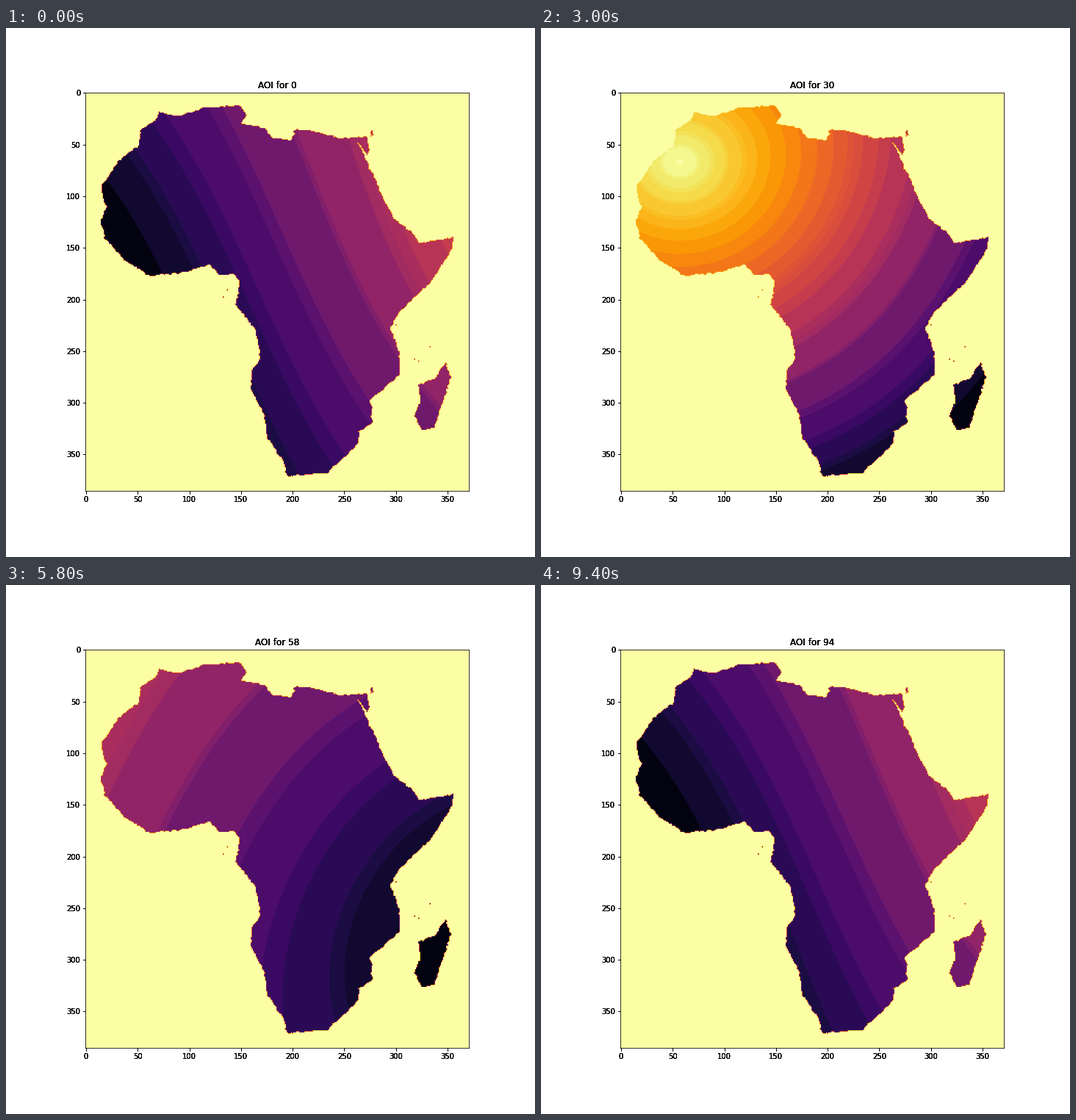
Recreate the animation shown at these times as a matplotlib script. Size 720 px wide and 720 px high, loop 9500 ms.

```python
import numpy as np
import matplotlib.pyplot as plt
from matplotlib.animation import FuncAnimation
from matplotlib.colors import ListedColormap
from matplotlib.path import Path

SIZE, DPI = 720, 72
COLS, ROWS = 371, 386
LEFT, TOP, CELL = 108.2, 87.6, 1.406   # plot origin and cell size in stage pixels
FRAMES, INTERVAL = 95, 100

# Key points of the coasts in stage pixels, clockwise from the north-west.
NORTH_EAST = [
    (209, 115), (236, 121), (270, 109), (320, 106), (327, 119), (320, 130),
    (352, 137), (361, 149), (388, 154), (394, 139), (411, 139), (452, 150),
    (491, 149), (494, 165), (491, 173), (479, 157), (499, 199), (512, 230),
    (529, 261), (556, 282), (562, 294), (610, 285), (604, 308), (578, 346),
    (532, 390), (523, 410), (535, 442), (536, 472), (496, 506), (499, 538),
]
SOUTH_WEST = [
    (481, 549), (478, 568), (437, 606), (383, 610), (379, 593), (356, 558),
    (352, 526), (333, 492), (335, 467), (347, 450), (340, 411), (313, 377),
    (319, 347), (311, 335), (291, 337), (278, 323), (236, 334), (196, 338),
    (164, 318), (136, 288), (129, 265), (136, 245), (130, 217), (152, 183),
    (181, 160), (184, 140), (205, 124),
]
MADAGASCAR = [
    (598, 455), (605, 476), (583, 544), (566, 548), (556, 528), (564, 508),
    (562, 486), (584, 477),
]
SPIT = [(496, 141), (499, 139), (500, 146), (497, 148)]
ISLETS = [(301, 357), (296, 366), (577, 434), (556, 451), (562, 454), (530, 405)]

# Solar geometry in degrees; the sun stands over NOON_CELL at step NOON.
DECLINATION, SUN_STEP, NOON = 23.44, 3.75, 23
NOON_CELL = (188.2, 67.1)
LON_STEP, LAT_STEP = .200, .2105

rng = np.random.default_rng(4)


def to_grid(points):
    return (np.array(points, float) - (LEFT, TOP)) / CELL


def ragged(points):
    """Subdivide a closed outline and roughen it slightly."""
    pts = to_grid(points)
    out = []
    for a, b in zip(pts, np.roll(pts, -1, axis=0)):
        n = max(1, round(np.hypot(*(b - a)) / 2))
        t = np.arange(n)[:, None] / n
        out.append(a + (b - a) * t)
    out = np.concatenate(out)
    return out + rng.normal(0, .45, out.shape)


def land_mask():
    x, y = np.meshgrid(np.arange(COLS) + .5, np.arange(ROWS) + .5)
    cells = np.column_stack([x.ravel(), y.ravel()])
    mask = np.zeros(len(cells), bool)
    for outline in (NORTH_EAST + SOUTH_WEST, MADAGASCAR, SPIT):
        mask |= Path(ragged(outline)).contains_points(cells)
    mask = mask.reshape(ROWS, COLS)
    for col, row in to_grid(ISLETS).astype(int):
        mask[row, col] = True
    return mask


def banded_cmap():
    """Inferno reduced to 3 bits of red, 4 of green and 3 of blue."""
    colors = plt.get_cmap("inferno")(np.linspace(0, 1, 256))[:, :3]
    bins = np.floor(colors * 255 / (32, 16, 32))
    _, group = np.unique(bins, axis=0, return_inverse=True)
    group = group.ravel()
    bands = np.array([colors[group == g].mean(axis=0) for g in group])
    bands[group == group[-1]] = colors[-1]
    return ListedColormap(bands)


land = land_mask()
rows, cols = np.nonzero(land)
lat = np.radians(DECLINATION + LAT_STEP * (NOON_CELL[1] - rows))
lon = np.radians(LON_STEP * (cols - NOON_CELL[0]))
dec = np.radians(DECLINATION)


def field(i):
    """Incidence angle, scaled so the largest is 0 and a direct hit is 1."""
    hour = lon - np.radians(SUN_STEP * (NOON - i))
    cosine = np.sin(dec) * np.sin(lat) + np.cos(dec) * np.cos(lat) * np.cos(hour)
    angle = np.arccos(np.clip(cosine, -1, 1))
    grid = np.ones((ROWS, COLS))
    grid[land] = 1 - angle / angle.max()
    return grid


plt.rcParams["font.family"] = "DejaVu Sans"
fig = plt.figure(figsize=(SIZE / DPI, SIZE / DPI), dpi=DPI, facecolor="white")
width, height = COLS * CELL, ROWS * CELL
rect = np.array([LEFT, SIZE - TOP - height, width, height]) / SIZE

# Stacked layers give the labels their heavy edges.
layers = [fig.add_axes(rect, label=f"layer{k}") for k in range(4)]
image = layers[0].imshow(field(0), cmap=banded_cmap(), vmin=0, vmax=1, aspect="auto")
for ax in layers:
    ax.set_xlim(-.5, COLS - .5)
    ax.set_ylim(ROWS - .5, -.5)
    ax.set_xticks(range(0, COLS, 50))
    ax.set_yticks(range(0, ROWS, 50))
for ax in layers[1:]:
    ax.patch.set_visible(False)
    ax.spines[:].set_visible(False)
titles = [ax.set_title("AOI for 0", fontsize=12) for ax in layers]


def update(i):
    image.set_data(field(i))
    for title in titles:
        title.set_text(f"AOI for {i}")
    return [image, *titles]


anim = FuncAnimation(fig, update, frames=FRAMES, interval=INTERVAL,
                     repeat=True, repeat_delay=0, blit=False)
plt.show()
```
